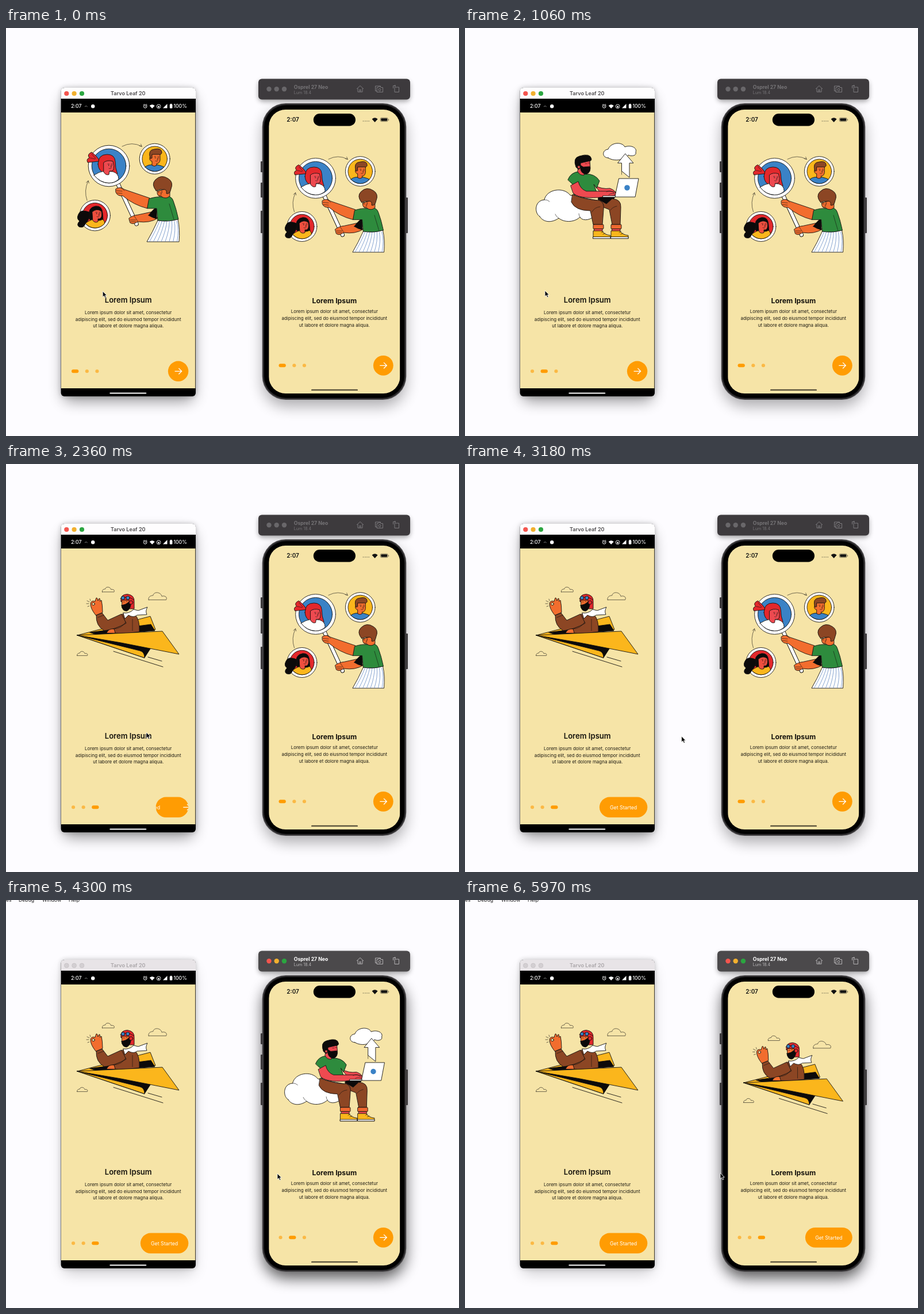
An HTML page that plays this animation: 788 by 710 pixels, repeating every 6000 ms.

```html
<!DOCTYPE html>
<html lang="en">
<head>
<meta charset="utf-8">
<title>Onboarding on two phones</title>
<style>
html, body { margin: 0; width: 100%; height: 100%; overflow: hidden; background: #fdfcff; }
svg { display: block; width: 788px; height: 710px; font-family: Inter, "Liberation Sans", sans-serif; }
.art { stroke: #141210; stroke-width: .9; stroke-linejoin: round; stroke-linecap: round; }
.mid { text-anchor: middle; }
.line { fill: none; }
.thin { fill: none; stroke-width: .6; }
.bare { stroke: none; }
</style>
</head>
<body>
<svg id="stage" viewBox="0 0 788 710" xmlns="http://www.w3.org/2000/svg"></svg>
<script>
const LOOP = 6000, SWITCH = 3760;
const ORANGE = '#ff9c03', SCREEN = '#f6e4a7';
const C = { red: '#e3282c', rose: '#ee4a50', skin: '#f26d2e', blue: '#3a82c6', yellow: '#fbb61c',
  green: '#2e8b3d', brown: '#8c4624', black: '#0c0a0a', white: '#fff' };

const path = (fill, d, extra = '') => `<path fill="${C[fill] || fill}" d="${d}" ${extra}/>`;
const line = (d, cls = 'line', extra = '') => `<path class="${cls}" d="${d}" ${extra}/>`;
const circle = (fill, x, y, r, extra = '') => `<circle cx="${x}" cy="${y}" r="${r}" fill="${C[fill] || fill}" ${extra}/>`;
const rect = (fill, x, y, w, h, r = 0, extra = '') =>
  `<rect x="${x}" y="${y}" width="${w}" height="${h}" rx="${r}" fill="${fill}" ${extra}/>`;
const text = (s, x, y, size, weight, fill, extra = '') =>
  `<text x="${x}" y="${y}" font-size="${size}" font-weight="${weight}" fill="${fill}" ${extra}>${s}</text>`;
const face = (x, y) => line(`M${x - 3} ${y - 3.2}h2.6M${x + 3} ${y - 3.2}h2M${x + 2} ${y - 1}l1.6 3h-2M${x - 1} ${y + 4.4}q2.5 1.4 4 -.4`, 'thin') +
  circle('black', x - 1.4, y - 1, .7, 'class="bare"') + circle('black', x + 4.2, y - 1, .7, 'class="bare"');

function searchScene() {
  const stripes = [...Array(8)].map((_, i) =>
    line(`M${267 + i * 4.3} ${336}Q${261 + i * 5.8} 352 ${250 + i * 6.8} 371`, 'thin', 'stroke="#2f62ac"')).join('');
  return [
    // magnified portrait
    path('none', 'M195 272L227 341', 'style="stroke-width:7.4"'),
    path('none', 'M195 272L227 341', 'style="stroke:#fff;stroke-width:5.4"'),
    circle('white', 179, 240, 35.8), circle('blue', 179, 240, 29.8),
    path('red', 'M160 237Q160 220 176 220Q189 220 190 232Q190 244 194 254Q186 257 180 250L172 252Q161 250 160 237Z'),
    path('white', 'M153 256Q162 250 171 249L186 250Q196 253 196 263Q189 269.8 179 269.8Q163 269 153 256Z'),
    path('rose', 'M170 234Q176 229 186 232Q189 240 187 247Q184 250 180 249L179 255Q174 257 170 251Z'),
    face(180, 240),
    path('red', 'M161 232L142 234Q139 228 145 226Q140 220 149 216Q157 222 161 228Z'),
    line('M146 226l9 2M149 219l7 8', 'thin'),
    // man in the upper ring
    circle('white', 258.7, 227.7, 26.5), circle('yellow', 258.7, 227.7, 21.8),
    path('blue', 'M242 242Q246 238 254 238H263Q272 240 275 242Q268 249.5 258.7 249.5Q249 249 242 242Z'),
    path('skin', 'M252 219L268 218V230Q267 236 262 236L262 239Q258 242 254 239V232Q249 231 250 226Z'),
    path('brown', 'M251 227Q246 212 258 211Q271 208 271 217Q270 221 266 220L254 220V226Z'), face(261, 227),
    // woman in the lower ring
    circle('white', 154.7, 326.2, 26.7), circle('red', 154.7, 326.2, 21.8),
    path('black', 'M145 332Q141 312 156 310Q167 309 168 322L169 334Q150 341 145 332Z'),
    path('yellow', 'M138 340Q146 334 152 333Q162 337 168 333Q173 337 171 341Q164 348 155 348Q145 348 138 340Z'),
    path('#ef4f3f', 'M150 320Q158 313 166 319Q168 330 163 332L160 332V337Q155 340 151 335Z'), face(159, 324),
    path('black', 'M146 321Q130 314 126 324Q122 332 128 336Q122 342 127 346Q136 349 138 340Q146 334 146 321Z'),
    // connecting arrows
    line('M202 206Q219 197 236 206M232 205L236.3 206.2L234.5 202', 'thin'),
    line('M141 300Q135 283 143 266M139.5 269L143.2 265.8L144.4 270', 'thin'),
    // the man holding the glass
    path('skin', 'M214 331Q220 326 230 325L253 320L264 331Q250 340 229 337Q221 343 216 339Z'),
    line('M216 334h10M217 337h9M223 327l6 9', 'thin'),
    path('black', 'M248 326Q256 315 262 312V332Q254 330 248 326Z'),
    path('skin', 'M191 280Q198 275 206 281L250 296L246 314Q222 308 203 292Q194 293 191 286Z'),
    line('M192 283l10 1M193 287l9 1M199 277l7 6', 'thin'),
    path('skin', 'M263 284L285 278V293Q279 299 271 296V293Q262 294 263 284Z'),
    path('green', 'M249 297Q262 293 271 294Q279 298 284 293Q290 296 291 301Q296 314 300 333Q282 338 264 335L262 314H246Z'),
    path('white', 'M264 335Q282 338 299 333Q303 350 301 372H245Q255 355 264 335Z'), stripes,
    path('brown', 'M261 283Q252 272 260 264Q270 254 282 262Q292 268 287 280Q285 290 279 288Q280 282 276 281Q268 280 261 283Z'),
    face(267, 287), line('M284 306l8 27', 'thin')
  ].join('');
}

function cloudScene() {
  const leg = (x, back) => rect('#f0692f', x, 342, 18, 7.5, 1) + path('rose', `M${x + 2} 349.5h14v5h-14Z`) +
    path('yellow', `M${x} 366V353H${x + 15}Q${x + 20} 360 ${x + 30} 361V366Z`) +
    path('white', `M${x} 363.5H${x + 30}V366.5H${x}Z`) + line(`M${x + 14} 356l4 -2M${x + 17} 359l4 -2`, 'thin');
  return [
    path('white', 'M130 328C120 322 121 300 138 299C142 280 172 276 183 291L230 300L224 328C215 336 203 335 200 329C192 337 175 340 163 331C150 340 136 338 130 328Z'),
    line('M138 299q5 -1 9 3M163 331q-5 -3 -6 -7M200 329q-2 -3 -2 -6', 'thin'),
    path('white', 'M249 226C238 226 238 212 249 211C254 198 274 198 278 207C288 203 300 208 297 216C299 222 290 224 284 221C280 228 262 234 249 226Z'),
    path('white', 'M279 219L293 235H286V260L272.5 249V235H266Z'), line('M272.5 249v6', 'thin'),
    path('rose', 'M226 274Q238 281 252 279Q263 283 263 290L240 292Z'),
    path('black', 'M232 293H262L250 308Q238 306 232 299Z'),
    path('brown', 'M232 298L246 306L256 297Q272 298 271 312L270 342H256L251 316L236 310Z'), leg(254),
    path('brown', 'M187 290Q214 300 234 300Q243 304 241 316L239 342H223L218 318Q192 318 185 303Z'), leg(223),
    line('M221 320q4 -8 14 -9M253 317q3 -5 11 -7', 'thin'),
    path('green', 'M179 264Q184 251 198 250L208 254Q226 253 234 266L229 279L224 272L231 291Q210 294 189 290L188 273Z'),
    path('rose', 'M184 274L197 267Q200 280 211 284L252 284Q265 285 267 291L232 295Q196 297 188 287Z'),
    line('M246 285q8 -4 13 2M250 290q7 -4 12 0', 'thin'),
    path('rose', 'M198 234L217 230L218 244Q217 252 208 252L207 256Q200 257 196 250Z'),
    path('black', 'M201 239L206 242L217 241Q220 251 211 254.500Q203 254 201 246Z'),
    path('black', 'M193 242Q187 226 199 223Q218 217 220 228Q220 232 214 232L201 235V243L198 246Z'),
    circle('rose', 198, 242, 2.4), line('M209 236h3M214 235h3M212 245h4', 'thin', 'stroke="#300"'),
    path('white', 'M268 262H302L296 294H261Z'), path('white', 'M240 292H262L261 294.500H240Z'),
    circle('blue', 282, 278, 4.8, 'class="bare"')
  ].join('');
}

function planeScene() {
  const cloud = (x, y, s) => line('M1 9H21C23 5 18 4 16 5C15 0 7 -1 6 4C2 4 0 7 1 9Z', 'thin',
    `transform="translate(${x} ${y}) scale(${s})" vector-effect="non-scaling-stroke"`);
  return [
    cloud(166.5, 213.5, 1.02), cloud(246.7, 222.7, 1.52), cloud(123, 325.5, .88),
    path('yellow', 'M124 298L251 265L260 288L180 298Z'), path('black', 'M146 293L252 279L259 290L160 298Z'),
    path('brown', 'M190 276Q196 261 208 260L224 262Q233 270 232 292Q208 296 186 294Z'),
    path('brown', 'M157 263L167 259L177 272Q190 266 201 261L209 277Q190 288 171 290Q156 282 157 263Z'),
    path('skin', 'M175 294Q178 286 188 287L190 294Z'), line('M188 287q14 -1 20 -12M220 270v20M160 267l10 -4', 'thin'),
    path('skin', 'M156 263Q147 252 147 243Q148 237 155 239L157 233Q159 232 160 238L162 234Q164 233 163.500 239L166 237Q168 246 168 258Z'),
    circle(SCREEN, 152, 243.500, 2.3), line('M141 238l4 2M140 243l4 0M142 248l3 -1M146 235l1 3', 'thin'),
    path('red', 'M200 239Q198 227 211 226.500Q224 228 223 240V252H215L200 239Z'),
    path('skin', 'M202 237H214V250Q208 256 202 250Z'),
    path('black', 'M201 246L208 244L214 240H217Q218 252 210 256Q202 256 201 246Z'),
    circle('red', 217.500, 241, 3.2), line('M199 234Q210 228 222 236'),
    circle('blue', 203.500, 233, 3.1), circle('blue', 212, 233, 3.1), line('M204 240h2M209 239h2', 'thin'),
    path('white', 'M204 259Q214 261 222 253L230 255L246 249Q242 256 245 262L228 263Q222 268 213 263L207 269Z'),
    path('black', 'M124 298L200 307L252 320L241 337Z'),
    path('yellow', 'M124 298L233 325Q241 327 241 337Z'),
    path('yellow', 'M124 298L272 291L301 331L200 311Z'), line('M187 326L273 353M247 336L271 343')
  ].join('');
}

const COPY = ['Lorem ipsum dolor sit amet, consectetur', 'adipiscing elit, sed do eiusmod tempor incididunt',
  'ut labore et dolore magna aliqua.'];

const phones = [
  { id: 'a', x: 96, y: 147, w: 233.5, h: 480, r: 0, cx: 212.7, rise: 60, art: '',
    title: [478.4, 13.1, 600], copy: 498, gap: 11.5, size: 7.95, dots: [114, 597.3], btn: [317.3, 597.3, 35.4, 83.4] },
  { id: 'b', x: 457.2, y: 142, w: 228.2, h: 494, r: 29, cx: 571.3, rise: 58,
    art: 'translate(571.5 318) scale(.975) translate(-212.8 -298)',
    title: [479, 12.3, 700], copy: 496.3, gap: 11.75, size: 7.95, dots: [474.5, 587.3], btn: [673.7, 587.3, 34.8, 81.8] }
];

function screen(p) {
  const pages = [0, 1, 2].map(i => `<g id="${p.id}p${i}"><use href="#scene${i}" ${p.art && `transform="${p.art}"`}/>` +
    text('Lorem Ipsum', p.cx, p.title[0], p.title[1], p.title[2], '#16130d', 'class="mid"') +
    COPY.map((s, k) => text(s, p.cx, p.copy + k * p.gap, p.size, 400, '#1d1a12', 'class="mid"')).join('') + '</g>').join('');
  const [right, cy, h] = p.btn;
  return `<clipPath id="${p.id}clip">${rect('#000', p.x, p.y, p.w, p.h, p.r)}</clipPath>
    <clipPath id="${p.id}btnclip">${rect('#000', right - h, cy - h / 2, h, h, h / 2, `id="${p.id}mask"`)}</clipPath>
    <g clip-path="url(#${p.id}clip)">${rect(SCREEN, p.x, p.y, p.w, p.h)}${pages}</g>` +
    [0, 1, 2].map(i => rect(ORANGE, 0, p.dots[1] - 3, 6, 6, 3, `id="${p.id}d${i}"`)).join('') +
    rect(ORANGE, right - h, cy - h / 2, h, h, h / 2, `id="${p.id}btn"`) +
    `<g clip-path="url(#${p.id}btnclip)"><path id="${p.id}arrow" d="M-6 0H6M.8 -5.200L6 0L.8 5.200" fill="none" stroke="#fff" stroke-width="1.3"/>` +
    text('Get Started', 0, cy + 3.2, 8.8, 400, '#fff', `class="mid" id="${p.id}label"`) + '</g>';
}

const wifi = (x, y, s, c) => `<path d="M0 4L-5 -1.500Q0 -6 5 -1.500Z" transform="translate(${x} ${y}) scale(${s})" fill="${c}"/>`;
const lights = (cy, xs, r, fills, extra = '') => xs.map((x, i) => circle(fills[i], x, cy, r, extra)).join('');
const TRAFFIC = ['#f4554e', '#f2b02e', '#2ba640'];
const shade = (id, x, y, w, h, r, blur) => rect('#000', x, y, w, h, r, `id="${id}" filter="url(#${blur})"`);

function leftWindow() {
  return shade('ashade', 100, 118, 226, 531, 10, 'soft') + rect('#000', 96, 104, 234, 537, 6, 'filter="url(#tight)" opacity=".22"') +
    rect('#000', 95.6, 104, 234.4, 537, 6) + path('#fff', 'M95.600 123V110Q95.600 104 102 104H324Q330 104 330 110V123Z', 'id="bar"') +
    `<g id="aon">${lights(114, [105.3, 118.6, 132], 4.1, TRAFFIC)}</g>` +
    `<g id="aoff">${lights(114, [105.3, 118.6, 132], 3.9, Array(3).fill('#d3cfd2'), 'stroke="#bfbbbe" stroke-width=".6"')}</g>` +
    text('Tarvo Leaf 20', 212.3, 117.2, 9.1, 600, '#4b494b', 'class="mid" id="aname"') +
    text('2:07', 113, 139.300, 8.8, 500, '#fff') + line('M137 137q2.300 -3 4.600 0', 'line', 'stroke="#888"') + circle('#fff', 151.2, 136.2, 3.2) +
    circle('none', 242.2, 136.4, 2.8, 'stroke="#fff"') + line('M238.800 134l2 -1.800M245.600 134l-2 -1.800M242.200 135v1.700h1.300', 'line', 'stroke="#fff" stroke-width=".8"') +
    wifi(254.2, 136.500, .9, '#fff') + circle('none', 265.600, 136.400, 3.4, 'stroke="#fff" stroke-width=".9"') + circle('#fff', 265.600, 136.900, 1.5) +
    path('#fff', 'M273 139.500L280.500 132V139.500Z') + rect('#fff', 284.800, 132.8, 4.6, 7, 1) + rect('#fff', 286, 131.8, 2.2, 1.5) +
    text('100%', 291.5, 139.300, 8.6, 500, '#fff') + screen(phones[0]) + rect('#fff', 180.3, 634.4, 64, 2.2, 1.1);
}

function rightWindow() {
  const icons = line('M610 106l6 -5.500l6 5.500M612 105v6.200h8v-6.200M615 111v-3.500h2v3.500') +
    line('M645.500 109.500h-3v-8.500h9v2M645 103.500h2l1 -1.500h3l1 1.500h3.500v8h-10.500Z') +
    circle('none', 650, 107.4, 2) + line('M676 103h7.500v8.500h-7.500ZM673.500 105v-4.500h4M676 98.800l1.800 1.700l-1.800 1.700');
  return shade('bshade', 447, 142, 248, 516, 40, 'soft') + rect('#000', 439, 92, 264, 36, 8, 'filter="url(#tight)" opacity=".35"') +
    rect('#3d3a3d', 439, 88.5, 264, 36, 6, 'id="tool"') +
    `<g id="bon">${lights(106.3, [457.5, 470.7, 484], 4.2, TRAFFIC)}</g><g id="boff">${lights(106.3, [457.5, 470.7, 484], 4.2, Array(3).fill('#69676a'))}</g>` +
    text('Osprel 27 Neo', 500.7, 105.5, 8.7, 700, '#777', 'id="bname"') + text('Lum 18.4', 500.7, 114.6, 7.2, 400, '#777', 'id="bver"') +
    `<g id="icons" fill="none" stroke-width="1">${icons}</g>` +
    [[443, 232, 19], [443, 269, 26], [443, 318, 39], [695, 295, 62]].map(([x, y, h]) => rect('#3b393b', x, y, 4, h, 1)).join('') +
    rect('#4a484a', 445.7, 131, 250.6, 516, 41) + rect('#262527', 447.2, 132.5, 247.6, 513, 39.5) + rect('#000', 449, 134.3, 244, 509.4, 38) +
    screen(phones[1]) + rect('#000', 534.8, 149, 73.2, 21.400, 10.7) + text('2:07', 488.3, 163.3, 10, 600, '#111') +
    [621.5, 624.8, 628, 631.2].map(x => circle('#9d946f', x, 162, .9)).join('') + wifi(641.6, 160, 1, '#111') +
    rect('none', 651.3, 156.3, 13, 6.400, 1.9, 'stroke="#6f6850" stroke-width=".8"') + rect('#111', 652.3, 157.3, 11, 4.4, 1.1) + rect('#6f6850', 665.2, 158.4, 1, 2.3, .5) +
    rect('#57503a', 531, 628.700, 81, 2.4, 1.2);
}

const scenes = [searchScene, cloudScene, planeScene];
const stage = document.getElementById('stage');
stage.innerHTML = `<defs>
  <filter id="soft" x="-30%" y="-20%" width="160%" height="140%"><feGaussianBlur stdDeviation="13"/></filter>
  <filter id="tight" x="-20%" y="-40%" width="140%" height="180%"><feGaussianBlur stdDeviation="4"/></filter>
  ${scenes.map((f, i) => `<g id="scene${i}" class="art">${f()}</g>`).join('')}</defs>
  ${rect('#fdfcff', 0, 0, 788, 710)}
  <g id="menu">${[['es', 0], ['Debug', 22], ['Window', 63], ['Help', 109]].map(([s, x]) => text(s, x, 3, 8.7, 400, '#222')).join('')}</g>
  ${leftWindow()}${rightWindow()}
  <path id="cursor" d="M0 0V10.200L2.400 8.100L4.100 11.800L6 11L4.300 7.400H7.300Z" fill="#0b0b0b" stroke="#fff" stroke-width=".8"/>`;

const el = {};
stage.querySelectorAll('[id]').forEach(n => el[n.id] = n);
const set = (id, attrs) => Object.entries(attrs).forEach(([k, v]) => el[id].setAttribute(k, v));

// tables of [ms, value...]
const scroll = {
  a: [[560, 0], [640, .1], [730, .4], [800, .68], [880, .89], [960, .98], [1030, 1], [1700, 1], [1790, 1.073], [1920, 1.2],
    [2030, 1.52], [2110, 1.8], [2200, 1.95], [2300, 2]],
  b: [[3790, 0], [3910, .097], [3980, .28], [4060, .62], [4140, .87], [4220, .97], [4300, 1], [4800, 1], [4900, 1.08], [4970, 1.2],
    [5030, 1.37], [5100, 1.65], [5180, 1.88], [5270, 1.98], [5350, 2]]
};
const grow = { a: [[2240, 0], [2360, .44], [2440, .8], [2510, 1]], b: [[5230, 0], [5350, .44], [5430, .8], [5500, 1]] };
const pointer = [[0, 168, 458], [380, 238, 460], [560, 236, 461], [760, 150, 457], [1060, 139, 457], [1250, 142, 459], [1600, 180, 467],
  [1700, 180, 467], [1790, 163, 467], [1920, 132, 466], [2050, 118, 466], [2360, 244, 467], [2700, 290, 468], [3200, 380, 474],
  [3700, 556, 476], [3790, 556, 476], [3910, 534, 476], [4060, 480, 476], [4300, 472, 476], [4390, 472, 476], [4680, 556, 477],
  [4800, 556, 477], [4900, 538, 477], [5030, 472, 476], [5160, 444, 475]];

function at(table, t) {
  const i = table.findIndex(k => k[0] > t);
  if (i === 0) return table[0].slice(1);
  if (i < 0) return table[table.length - 1].slice(1);
  const a = table[i - 1], b = table[i], u = (t - a[0]) / (b[0] - a[0]);
  return a.slice(1).map((v, k) => v + (b[k + 1] - v) * u);
}

function drawPhone(p, t) {
  const [pos] = at(scroll[p.id], t), [k] = at(grow[p.id], t);
  let x = p.dots[0];
  for (let i = 0; i < 3; i++) {
    const d = i - pos, near = Math.max(0, 1 - Math.abs(d));
    set(p.id + 'p' + i, { transform: `translate(${d * p.w} ${Math.abs(d) * p.rise})`, opacity: near, display: near ? 'inline' : 'none' });
    const w = 6.1 + 6.2 * near;
    set(p.id + 'd' + i, { x, width: w, opacity: .6 + .4 * near });
    x += w + 11.5;
  }
  const [right, cy, h, full] = p.btn, w = h + (full - h) * k;
  for (const part of ['btn', 'mask']) set(p.id + part, { x: right - w, width: w });
  set(p.id + 'arrow', { transform: `translate(${right - h / 2 + 33 * k} ${cy})`, display: k < 1 ? 'inline' : 'none' });
  set(p.id + 'label', { x: right - full / 2 - 56 * (1 - k), display: k > 0 ? 'inline' : 'none' });
}

function focus(right) {
  const show = (id, on) => set(id, { display: on ? 'inline' : 'none' });
  show('menu', right);
  show('aon', !right); show('aoff', right);
  show('bon', right); show('boff', !right);
  set('bar', { fill: right ? '#e8e4e7' : '#fefdfe' });
  set('aname', { fill: right ? '#a9a5a8' : '#4b494b' });
  set('tool', { fill: right ? '#4b494b' : '#3d3a3d' });
  set('bname', { fill: right ? '#fff' : '#757376' });
  set('bver', { fill: right ? '#b9b7b9' : '#757376' });
  set('icons', { stroke: right ? '#b3b1b3' : '#7b797c' });
  set('ashade', { opacity: right ? .2 : .42 });
  set('bshade', { opacity: right ? .65 : .32 });
}

function draw(t) {
  phones.forEach(p => drawPhone(p, t));
  focus(t >= SWITCH);
  set('cursor', { transform: `translate(${at(pointer, t)})` });
}

const start = performance.now();
function tick() {
  draw((performance.now() - start) % LOOP);
  requestAnimationFrame(tick);
}
draw(0);
requestAnimationFrame(tick);
</script>
</body>
</html>
```
